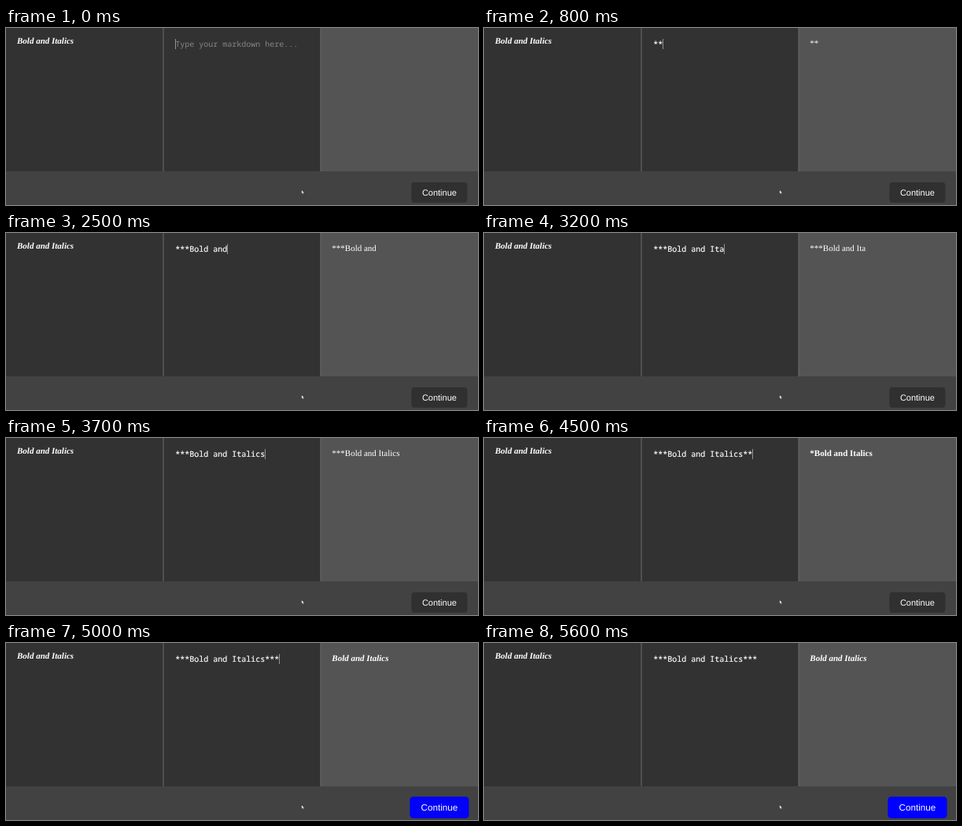
Recreate the animation shown at these times as an HTML page. Size 600 px wide and 226 px high, loop 5.7 s.

```html
<!DOCTYPE html>
<html lang="en">
<head>
<meta charset="utf-8">
<title>Markdown lesson</title>
<style>
  html, body { margin: 0; width: 100%; height: 100%; overflow: hidden; background: #424242; }
  svg { display: block; width: 100%; height: 100%; }
  text { white-space: pre; fill: #fff; text-rendering: geometricPrecision; }
  .serif { font: 11px "Liberation Serif", serif; }
  .bold { font-weight: bold; }
  .italic { font-style: italic; }
  .mono { font: 10px "Noto Sans Mono", monospace; }
  .typed { stroke: #fff; stroke-width: .2px; }
  .hint { fill: #858585; }
  .label { font: 11px "Liberation Sans", sans-serif; text-anchor: middle; }
</style>
</head>
<body>
<svg viewBox="0 0 600 226" preserveAspectRatio="none">
  <rect width="600" height="226" fill="#424242"/>
  <rect width="400" height="183" fill="#333233"/>
  <rect x="400" width="200" height="183" fill="#555455"/>
  <path d="M200.5 0V183M400.5 0V183" transform="translate(-.5)" stroke="#6c6c6c" shape-rendering="geometricPrecision"/>

  <text class="serif bold italic" x="14" y="19.7">Bold and Italics</text>

  <text id="hint" class="mono hint" x="215.3" y="24">Type your markdown here...</text>
  <text id="typed" class="mono typed" x="215.3" y="24"></text>
  <rect id="caret" y="14" width="1" height="13" fill="#929292"/>

  <text class="serif" x="414.3" y="22.7"><tspan id="stars"></tspan><tspan id="body"></tspan></text>
  <circle id="bullet" cx="406.5" cy="45.5" r="2" fill="#fff"/>
  <rect id="rule" x="414" y="13" width="186" height="1" fill="#8a8a8a"/>

  <g id="button">
    <rect id="face" x="515.4" y="197" width="71" height="26" rx="4"/>
    <text class="label" x="550.9" y="213.7">Continue</text>
  </g>
  <path d="M375.8 207V211.4L376.8 210.6L377.6 212.2L378.4 211.8L377.7 210.3L379 210.2Z" fill="#fff" stroke="#222" stroke-width=".3"/>
</svg>
<script>
const LOOP = 5700, TICK = 100;
const PHRASE = "Bold and Italics";
const SOURCE = `***${PHRASE}***`;

// [time in ms, characters typed]
const KEYS = [
  [0, 0], [400, 1], [800, 2], [1100, 3], [1500, 4], [1800, 5],
  [2100, 6], [2200, 7], [2300, 8], [2400, 10], [2500, 11], [2700, 12],
  [2900, 13], [3000, 14], [3200, 15], [3300, 16],
  [3500, 17], [3600, 18], [3700, 19], [4200, 20], [4500, 21], [4700, 22]
];
const HOVER_START = 4700, CARET_OFF = 5300;
const HOVER = [.13, .67, .88, .96, .99, 1];

const el = Object.fromEntries(
  [...document.querySelectorAll("[id]")].map(node => [node.id, node]));
const show = (node, on) => node.setAttribute("visibility", on ? "visible" : "hidden");
const mix = (a, b, p) => Math.round(a + (b - a) * p);

function drawPreview(count) {
  const closing = Math.max(0, count - 3 - PHRASE.length);
  const isBlock = count === 1 || count === 3;
  el.stars.textContent = isBlock ? "" : "*".repeat(Math.min(count, 3) - closing);
  el.stars.classList.toggle("bold", closing >= 2);
  el.body.textContent = SOURCE.slice(3, Math.min(count, 3 + PHRASE.length));
  el.body.classList.toggle("italic", closing % 2 === 1);
  el.body.classList.toggle("bold", closing >= 2);
  show(el.bullet, count === 1);
  show(el.rule, count === 3);
}

function drawButton(time) {
  const step = Math.floor((time - HOVER_START) / TICK);
  const p = step < 0 ? 0 : HOVER[Math.min(step, HOVER.length - 1)];
  const dim = mix(48, 0, p);
  el.face.setAttribute("fill", `rgb(${dim},${dim},${mix(48, 255, p)})`);
  el.button.setAttribute("transform",
    `translate(550.9 210) scale(${1 + .06 * p}) translate(-550.9 -210)`);
}

function draw(time) {
  const count = KEYS.findLast(([start]) => start <= time)[1];
  show(el.hint, count === 0);
  el.typed.textContent = SOURCE.slice(0, count);
  el.caret.setAttribute("x", 215 + 6 * count);
  show(el.caret, time < CARET_OFF);
  drawPreview(count);
  drawButton(time);
}

const origin = performance.now();
function frame() {
  draw((performance.now() - origin) % LOOP);
  requestAnimationFrame(frame);
}
frame();
</script>
</body>
</html>
```
